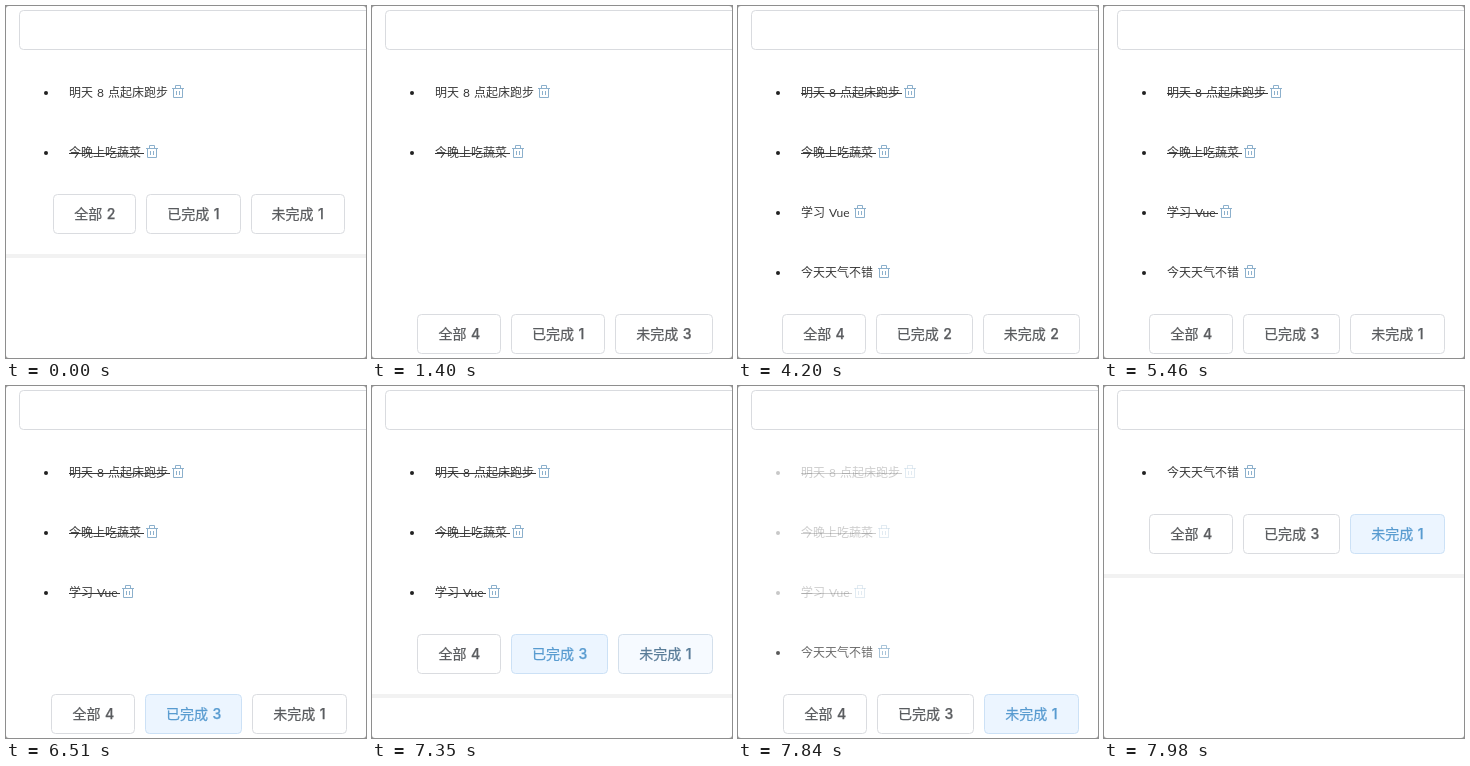
Write an HTML page with a canvas that moves like this. It is 360x352 px and loops after 8000 ms.

```html
<!DOCTYPE html>
<html lang="zh-CN">
<head>
<meta charset="utf-8">
<title>Todo list</title>
<style>
  html, body { margin: 0; overflow: hidden; background: #fff; }
  canvas { display: block; }
</style>
</head>
<body>
<canvas id="stage" width="360" height="352"></canvas>
<script>
const LOOP = 8000, STEP = 70, ROW = 60, FADE = 280;
const CJK = '"Noto Sans CJK SC", "Noto Sans CJK JP", "Noto Sans CJK", sans-serif';
const LIST_FONT = `12px Lato, ${CJK}`;
const BUTTON_FONT = `500 14px Inter, ${CJK}`;

const ADDED = 1400, FILTER_DONE = 6230, FILTER_OPEN = 7630;
const items = [
  { text: '明天 8 点起床跑步', icon: 172, doneAt: 4200 },
  { text: '今晚上吃蔬菜', icon: 146, doneAt: 0 },
  { text: '学习 Vue', icon: 122, doneAt: 5460 },
  { text: '今天天气不错', icon: 146, doneAt: Infinity },
];

const ctx = document.getElementById('stage').getContext('2d');
const ramp = (t, start, length) => Math.min(1, Math.max(0, (t - start) / length));
const mix = (a, b, k) => `rgb(${a.map((v, i) => Math.round(v + (b[i] - v) * k))})`;

function box(x, y, w, h, r, fill, stroke) {
  ctx.beginPath();
  ctx.roundRect(x, y, w, h, r);
  ctx.fillStyle = fill;
  ctx.fill();
  if (stroke) {
    ctx.lineWidth = 1;
    ctx.strokeStyle = stroke;
    ctx.stroke();
  }
}

function drawTrash(x, y) {
  ctx.lineWidth = 1;
  ctx.strokeStyle = '#8cb0cc';
  ctx.stroke(new Path2D(`M${x - 6} ${y - 3.5}h12
    M${x - 2.5} ${y - 3.5}v-3h5v3
    M${x - 4.5} ${y - 3.5}v9h9v-9
    M${x - 1.5} ${y - 1}v4 M${x + 1.5} ${y - 1}v4`));
}

function drawItem(item, y, alpha, t) {
  ctx.globalAlpha = alpha;
  ctx.fillStyle = '#222';
  ctx.beginPath();
  ctx.arc(40, y, 2, 0, 7);
  ctx.fill();
  ctx.fillStyle = '#383838';
  ctx.font = LIST_FONT;
  ctx.wordSpacing = '1px';
  ctx.fillText(item.text, 63, y + 4);
  if (t >= item.doneAt) ctx.fillRect(63, y, item.icon - 71, 1);
  drawTrash(item.icon, y - 1);
  ctx.globalAlpha = 1;
}

function drawButtons(buttons, y) {
  ctx.font = BUTTON_FONT;
  ctx.wordSpacing = '0.7px';
  const widths = buttons.map(b => ctx.measureText(b.label).width + 42);
  let x = 193 - (widths.reduce((a, b) => a + b) + 20) / 2;
  buttons.forEach(({ label, hot }, i) => {
    const left = Math.round(x), right = Math.round(x + widths[i]);
    box(left + 0.5, y + 0.5, right - left - 1, 39, 4,
      mix([255, 255, 255], [236, 245, 255], hot),
      mix([218, 220, 224], [204, 225, 246], hot));
    // A hairline stroke gives the Chinese glyphs a medium weight.
    ctx.lineWidth = 0.25;
    ctx.fillStyle = ctx.strokeStyle = mix([90, 92, 95], [88, 155, 208], hot);
    ctx.fillText(label, x + 21, y + 25);
    ctx.strokeText(label, x + 21, y + 25);
    x += widths[i] + 10;
  });
}

function visibleRows(t) {
  if (t < ADDED) return [0, 1];
  if (t < FILTER_DONE + FADE + STEP) return [0, 1, 2, 3];
  if (t < FILTER_OPEN) return [0, 1, 2];
  return t < FILTER_OPEN + FADE + STEP ? [0, 1, 2, 3] : [3];
}

function itemAlpha(i, t) {
  const entered = i < 2 ? 1 : ramp(t, ADDED, FADE);
  const filtered = ramp(t, FILTER_OPEN, FADE);
  return i < 3 ? entered - filtered : entered - ramp(t, FILTER_DONE, FADE) + filtered;
}

function draw(t) {
  ctx.fillStyle = '#999';
  ctx.fillRect(0, 0, 360, 352);
  box(0, 0, 360, 352, 3, '#fff');
  box(13.5, 4.5, 400, 39, 4, '#fff', '#d9dbdf');

  const rows = visibleRows(t);
  rows.forEach((i, row) => drawItem(items[i], 87 + row * ROW, itemAlpha(i, t), t));

  const total = t < ADDED ? 2 : 4;
  const done = items.filter(item => t >= item.doneAt).length;
  const y = 68 + rows.length * ROW;
  drawButtons([
    { label: `全部 ${total}`, hot: 0 },
    { label: `已完成 ${done}`, hot: ramp(t, 5810, 70) - ramp(t, 7560, 80) },
    { label: `未完成 ${total - done}`, hot: ramp(t, 7280, 140) },
  ], y);
  ctx.fillStyle = '#f2f2f2';
  ctx.fillRect(0, y + ROW, 360, 4);
}

function tick() {
  const t = performance.now() % LOOP;
  draw(Math.floor(t / STEP) * STEP);
  requestAnimationFrame(tick);
}
tick();
</script>
</body>
</html>
```
